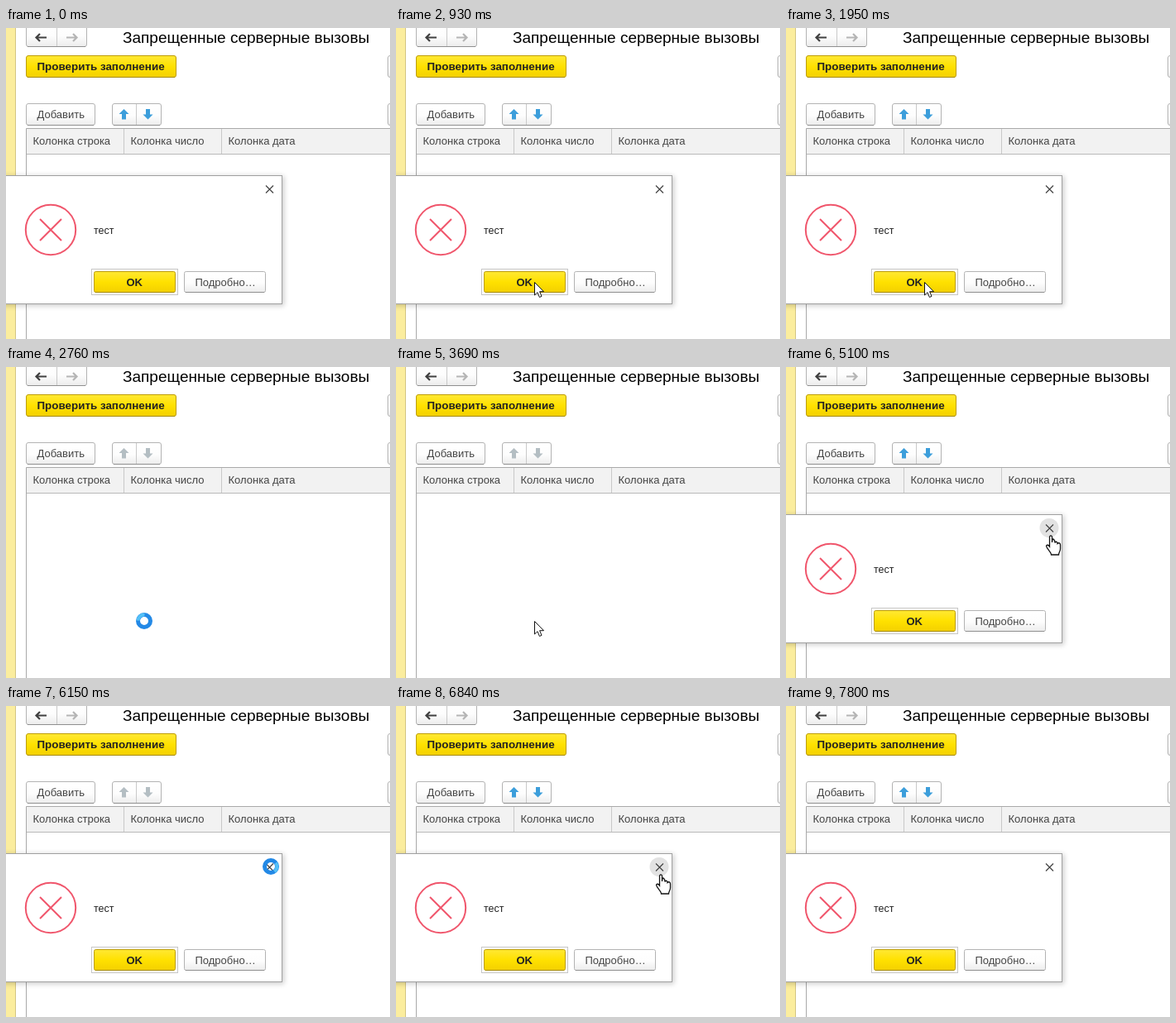
Animation of 464 by 376 pixels, one loop 9600 ms. Source, as an HTML page:

```html
<!DOCTYPE html>
<html lang="ru">
<head>
<meta charset="utf-8">
<style>
  html, body { margin: 0; width: 100%; height: 100%; overflow: hidden; background: #fff; }
  svg { display: block; width: 464px; height: 376px; }
  text { font: 13px "Liberation Sans", Arial, sans-serif; fill: #444; }
  .title { font-size: 19px; fill: #000; }
  .bold { font-weight: bold; font-size: 13.4px; fill: #222; }
  .plain { fill: url(#grey); stroke: #b3b3b3; }
  .main { fill: url(#yellow); stroke: #bd9d05; }
  .rule { fill: none; stroke: #a9a9a9; }
  .split { stroke: #c9c9c9; }
  .lip { stroke: #8f8f8f; }
  .gold { stroke: #a68a00; }
</style>
</head>
<body>
<svg viewBox="0 0 464 376">
  <defs>
    <linearGradient id="grey" x2="0" y2="1">
      <stop stop-color="#fff"/><stop offset=".55" stop-color="#fdfdfd"/><stop offset="1" stop-color="#ececec"/>
    </linearGradient>
    <linearGradient id="yellow" x2="0" y2="1">
      <stop stop-color="#ffe834"/><stop offset=".5" stop-color="#ffe100"/><stop offset="1" stop-color="#f3d000"/>
    </linearGradient>
    <filter id="blur" x="-10%" y="-10%" width="120%" height="120%"><feGaussianBlur stdDeviation="3"/></filter>
    <path id="up" d="M0-6.5 6-.5H2.5V6h-5V-.5H-6Z"/>
    <path id="back" d="M-1-4.5-5.5 0-1 4.5M-5 0H7" fill="none" stroke-width="2.2"/>
  </defs>

  <rect width="464" height="376" fill="#fff"/>
  <rect width="11" height="376" fill="#fbed9e"/>
  <path d="M11.5 0V376" stroke="#d3c583"/>

  <rect class="plain" x="24.5" y="-6.5" width="73" height="29" rx="2.5"/>
  <path class="split" d="M61.5 0V22"/>
  <path class="lip" d="M26 22.5H96"/>
  <use href="#back" x="42" y="11.5" stroke="#404040"/>
  <use href="#back" transform="translate(80 11.5) scale(-1 1)" stroke="#b5b5b5"/>
  <text class="title" x="141" y="18">Запрещенные серверные вызовы</text>

  <rect class="main" x="24.5" y="33.5" width="181" height="26" rx="2.5"/>
  <path class="gold" d="M26 59.5H204"/>
  <text class="bold" x="37.5" y="51">Проверить заполнение</text>
  <rect class="plain" x="461.5" y="33.5" width="30" height="26" rx="2.5"/>

  <rect class="plain" x="24.5" y="91.5" width="83" height="26" rx="2.5"/>
  <path class="lip" d="M26 117.5H106"/>
  <text x="37.5" y="109">Добавить</text>
  <rect class="plain" x="128.5" y="91.5" width="59" height="26" rx="2.5"/>
  <path class="split" d="M157.5 92V117"/>
  <path class="lip" d="M130 117.5H186"/>
  <g id="arrows">
    <use href="#up" x="142.5" y="104.5"/>
    <use href="#up" transform="translate(171.5 104) scale(1 -1)"/>
  </g>
  <rect class="plain" x="461.5" y="91.5" width="30" height="26" rx="2.5"/>

  <rect x="24" y="121" width="440" height="32" fill="#f2f2f2"/>
  <path class="rule" d="M464 121.5H24.5V376"/>
  <path class="rule" d="M25 152.5H464" style="stroke:#b9b9b9"/>
  <path class="split" d="M142.5 122V152M260.5 122V152"/>
  <text x="32.5" y="141">Колонка строка</text>
  <text x="150.5" y="141">Колонка число</text>
  <text x="268.5" y="141">Колонка дата</text>

  <g id="dialog">
    <rect x="-20" y="179" width="356" height="157" fill="#000" opacity=".2" filter="url(#blur)"/>
    <rect x="-20.5" y="178.5" width="354" height="155" fill="#fff" stroke="#a0a0a0"/>
    <circle id="hover" cx="318" cy="194.500" r="11.5" fill="#e2e2e2"/>
    <path d="M314 190.500l9 9m0-9l-9 9" stroke="#444" stroke-width="1.2"/>
    <g fill="none" stroke="#f0566c" stroke-width="2">
      <circle cx="54" cy="244" r="30.2"/>
      <path d="M41 231l26 26m0-26l-26 26"/>
    </g>
    <text x="106" y="249" style="font-size:12.5px;fill:#222">тест</text>
    <rect x="103.500" y="291.5" width="104" height="31" fill="none" stroke="#c6c6c6"/>
    <rect class="main" x="106.5" y="294.5" width="98" height="25" rx="2"/>
    <path class="gold" d="M108 319.5H203"/>
    <text class="bold" x="145.500" y="312" style="font-size:13px">OK</text>
    <rect class="plain" x="215.5" y="294.5" width="98" height="25" rx="2"/>
    <path class="lip" d="M217 319.5H312"/>
    <text x="228.500" y="312">Подробно…</text>
  </g>

  <g id="cursor">
    <path id="arrow" d="M.5.500V16L4 12.700 6.400 18.500 9 17.400 6.600 11.700H11.500Z" fill="#fff" stroke="#111"/>
    <path id="hand" d="M-1.500 1.500C-1.500-.5 1.500-.5 1.500 1.500V8C2-.0 5 6 5 8.500 6 6.500 8 7 8 9.500 9.500 8 11.500 9 11.500 11V16C11.500 19 9.500 20 9.500 23H.5C.5 20-5 15.500-5.500 12.500-5 10.500-3 11-1.500 13Z"
      fill="#fff" stroke="#111" stroke-width="1.3"/>
    <g id="busy" fill="none">
      <circle r="7.500" stroke="#2389e6" stroke-width="5"/>
      <path id="glint" d="M0-7.500A7.500 7.500 0 0 1 7.500 0" stroke="#54c0f7" stroke-width="4"/>
    </g>
  </g>
</svg>
<script>
const LOOP = 9600, TICK = 30;
const el = id => document.getElementById(id);
const show = (id, on) => el(id).style.display = on ? '' : 'none';

// [appears, starts to fade, gone]
const dialogs = [
  [0, 600, 750], [930, 1080, 1260], [1440, 1590, 1770], [1950, 2070, 2250],
  [2400, 2550, 2700], [2880, 3030, 3180], [3390, 3540, 3660], [3870, 4020, 4200],
  [4380, 5310, 5550], [5700, 5970, 6120], [6150, 6450, 6600], [6690, 6930, 7110],
  [7200, LOOP, LOOP]
];
const waits = [[2730, 2880], [3210, 3390], [4230, 4350], [6060, 6180], [6600, 6690], [7110, 7200]];
// [time, x, y] of the pointer tip
const path = [
  [60, 361, 118], [240, 249, 203], [330, 193, 244], [360, 181, 255], [420, 169, 274], [540, 167, 307],
  [4440, 167, 307], [4650, 249, 275], [4740, 266, 266], [5010, 320, 204],
  [7380, 320, 204], [7500, 359, 180], [7590, 393, 164], [7680, 419, 147], [7800, 464, 115]
];

function pointAt(t) {
  const i = Math.max(1, path.findIndex(p => p[0] >= t));
  const [t0, x0, y0] = path[i - 1], [t1, x1, y1] = path[i];
  const k = (t - t0) / (t1 - t0);
  return [x0 + (x1 - x0) * k, y0 + (y1 - y0) * k];
}

function opacityAt(t) {
  const d = dialogs.find(([from, , to]) => t >= from && t < to);
  if (!d) return 0;
  return t < d[1] ? 1 : 1 - (t - d[1] + TICK) / (d[2] - d[1] + TICK);
}

function draw(now) {
  const t = Math.floor((now % LOOP) / TICK) * TICK;
  const opacity = opacityAt(t), open = opacity === 1;
  const busy = waits.some(([from, to]) => t >= from && t < to);
  const onClose = open && !busy && t >= 5010 && t < 7380;
  const visible = t >= 60 && t < 7800;

  el('dialog').style.opacity = opacity;
  el('arrows').setAttribute('fill', open && !busy ? '#3c9edb' : '#b4bec3');
  show('hover', onClose);
  show('cursor', visible);
  show('busy', busy);
  show('hand', onClose);
  show('arrow', !busy && !onClose);
  if (visible) {
    const [x, y] = pointAt(t);
    const lift = busy && t > 5010 ? -10 : 0;
    el('cursor').setAttribute('transform', `translate(${Math.round(x)} ${Math.round(y + lift)})`);
    el('glint').setAttribute('transform', `rotate(${t * 0.36})`);
  }
}

const start = performance.now();
(function frame() {
  draw(performance.now() - start);
  requestAnimationFrame(frame);
})();
</script>
</body>
</html>
```
